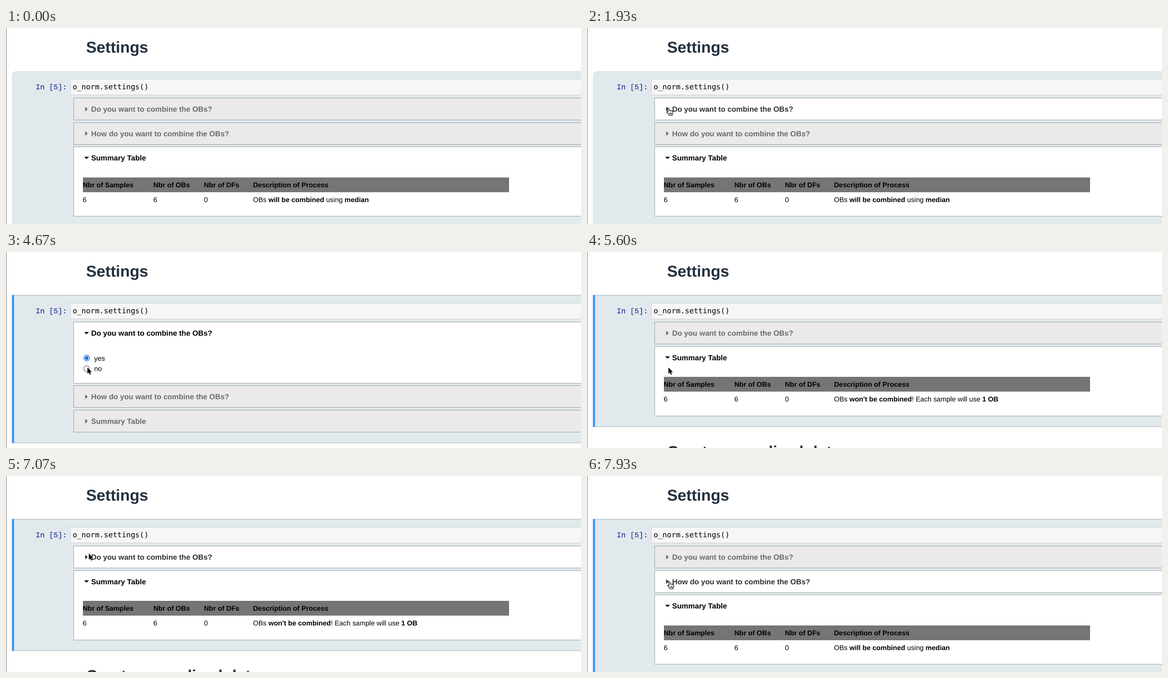
An HTML page for the animation above (8000 ms loop, 1278 by 438 pixels).

```html
<!DOCTYPE html>
<html lang="en">
<head>
<meta charset="utf-8">
<title>Notebook settings</title>
<style>
html, body { margin: 0; width: 100%; height: 100%; overflow: hidden; background: #fff; }
svg { display: block; }
text { font: 15.4px "Liberation Sans", Arial, sans-serif; text-rendering: geometricPrecision; white-space: pre; }
.b, .title, .h1 { font-weight: bold; }
.h1 { font-size: 35px; fill: #23303f; }
.title { font-size: 16.55px; }
.prompt { font: 16.5px "Liberation Mono", Courier, monospace; fill: #303f9f; stroke: #303f9f; stroke-width: .3px; }
.code { font: 16.5px "DejaVu Sans Mono", Menlo, monospace; }
</style>
</head>
<body>
<svg width="1278" height="438" viewBox="0 0 1278 438">
  <g id="page"></g>
  <g id="cursor" stroke-linejoin="round">
    <path id="arrow" d="M0 0V14L3.1 11.1 5.2 16 7.7 15 5.6 10.2H9.9Z" stroke="#fff" stroke-width="1.3" paint-order="stroke"/>
    <path id="hand" fill="#fff" stroke="#000" stroke-width="1.2"
      d="M-2 1C-2-.9 .8-.9 1.1 1L2 6C2.5 4.6 4.6 4.7 4.8 6.2 5.6 5 7.2 5.3 7.4 6.8 8.3 6 9.8 6.5 9.8 8V11.5L8.3 14.3V16.5H1.2V14.8L-3.6 9.7C-4.4 8.3-2.8 7.4-1.6 8.4L-.6 9.2ZM2.7 10.5V14M4.7 10.5V14M6.7 10.5V14"/>
  </g>
</svg>
<script>
const LOOP = 8000, STEP = 1000 / 15;
const $ = id => document.getElementById(id);

const rect = (x, y, w, h, fill, extra = '') =>
  `<rect x="${x}" y="${y}" width="${w}" height="${h}" fill="${fill}" ${extra}/>`;
const box = (x, top, bottom, fill, line, rx = 0) =>
  rect(x + .5, top + .5, 1300, bottom - top, fill, `stroke="${line}" rx="${rx}"`);
const text = (x, y, str, cls = '', fill = '') =>
  `<text x="${x}" y="${y}" class="${cls}" ${fill && `fill="${fill}"`}>${str}</text>`;
const bold = str => `<tspan class="b">${str}</tspan>`;

function radio(y, label, on) {
  const ring = `<circle cx="179.3" cy="${y}" r="6.5" fill="#fff" stroke="${on ? '#1b6fe0' : '#707070'}" stroke-width="1.3"/>`;
  const dot = on ? `<circle cx="179.3" cy="${y}" r="4.3" fill="#1b6fe0"/>` : '';
  return ring + dot + text(196, y + 5.5, label);
}

const choice = picked => ({
  height: 136.8,
  draw: y => radio(y + 81, 'yes', picked === 'yes') + radio(y + 104.7, 'no', picked === 'no')
});

const columns = [170.5, 327.5, 440, 549];
const table = result => ({
  height: 155,
  draw: y => {
    const top = Math.round(y + 68.7);
    const row = (cells, base, cls) => cells.map((c, i) => text(columns[i], base, c, cls)).join('');
    return rect(171, top, 946, 33, '#757575') + rect(1117, top, 1, 33, '#4f8052') +
      row(['Nbr of Samples', 'Nbr of OBs', 'Nbr of DFs', 'Description of Process'], top + 21.5, 'b') +
      row(['6', '6', '0', result], top + 55);
  }
});

function panel(y, bottom, { title, body, hover }) {
  const color = body ? '#000' : hover ? '#303030' : '#6b6b6b';
  const mark = body ? `M173.7 ${y + 22.7}h10.6l-5.3 5.4z` : `M176 ${y + 20}v10.6l5.6-5.3z`;
  return box(150, Math.round(y), Math.round(bottom), body || hover ? '#fff' : '#eaeaea', '#949a9d') +
    `<path d="${mark}" fill="${color}"/>` + text(189.2, y + 31, title, 'title', color) +
    (body ? body.draw(y) : '');
}

function page({ selected, panels }) {
  let y = 156, bottom, content = '';
  for (const p of panels) {
    bottom = y + (p.body ? p.body.height : 49.1);
    content += panel(y, bottom, p);
    y = bottom + 5.4;
  }
  const end = Math.round(bottom) + 24;
  const cell = selected
    ? box(13, 96, end, '#e1e9ed', '#a3abae', 6) + rect(13, 96, 5, end - 95, '#429bf4')
    : rect(13, 96, 1300, end - 96, '#e1e9ed', 'rx="10"');
  return rect(0, 0, 1, 438, '#707070') + text(178, 55, 'Settings', 'h1') + cell +
    box(143, 114, 149, '#f6f6f6', '#cccfd0') +
    text(66, 137, 'In [5]:', 'prompt') + text(148, 137, 'o_norm.settings()', 'code') +
    content + text(178, end + 68, 'Create normalized data', 'h1');
}

const ask = (body, hover) => ({ title: 'Do you want to combine the OBs?', body, hover });
const how = hover => ({ title: 'How do you want to combine the OBs?', hover });
const summary = body => ({ title: 'Summary Table', body });
const combined = table(`OBs ${bold('will be combined')} using ${bold('median')}`);
const separate = table(`OBs ${bold("won't be combined")}! Each sample will use ${bold('1 OB')}`);
const scene = (start, selected, ...panels) => ({ start, selected, panels });

const scenes = [
  scene(0, false, ask(), how(), summary(combined)),
  scene(1930, false, ask(null, true), how(), summary(combined)),
  scene(2730, true, ask(choice('yes')), how(), summary()),
  scene(5470, true, ask(), summary(separate)),
  scene(6600, true, ask(null, true), summary(separate)),
  scene(7130, true, ask(choice('no')), summary()),
  scene(7930, true, ask(), how(true), summary(combined))
];

// Cursor legs: start, end, from x, from y, to x, to y
const legs = [
  [400, 1200, 985, 269, 262, 200],
  [1270, 1730, 262, 200, 181, 179],
  [3600, 4070, 181, 178, 181, 261],
  [4330, 4470, 181, 261, 181, 258],
  [6200, 6800, 181, 258, 184, 173],
  [7130, 7800, 184, 173, 183, 236]
];
const handTimes = [[1930, 2730], [4330, 4670], [6800, 7070], [7930, LOOP]];

function cursorAt(t) {
  const [t0, t1, x0, y0, x1, y1] = legs.findLast(leg => t >= leg[0]) || legs[0];
  const p = Math.min(1, Math.max(0, (t - t0) / (t1 - t0)));
  const k = t0 === 400 ? 1 - (1 - p) ** 2 : p * p * (3 - 2 * p);
  return [x0 + (x1 - x0) * k, y0 + (y1 - y0) * k];
}

let shown;
function frame(now) {
  const t = now % LOOP;
  const current = scenes.findLast(s => t >= s.start);
  if (current !== shown) $('page').innerHTML = page(shown = current);

  const stepped = Math.floor((t + 5) / STEP) * STEP;
  const [x, y] = cursorAt(stepped);
  const hand = handTimes.some(([a, b]) => t >= a && t < b);
  $('cursor').setAttribute('transform', `translate(${x} ${y})`);
  $('cursor').style.display = t < 400 ? 'none' : '';
  $('hand').style.display = hand ? '' : 'none';
  $('arrow').style.display = hand ? 'none' : '';
  requestAnimationFrame(frame);
}
frame(0);
</script>
</body>
</html>
```
